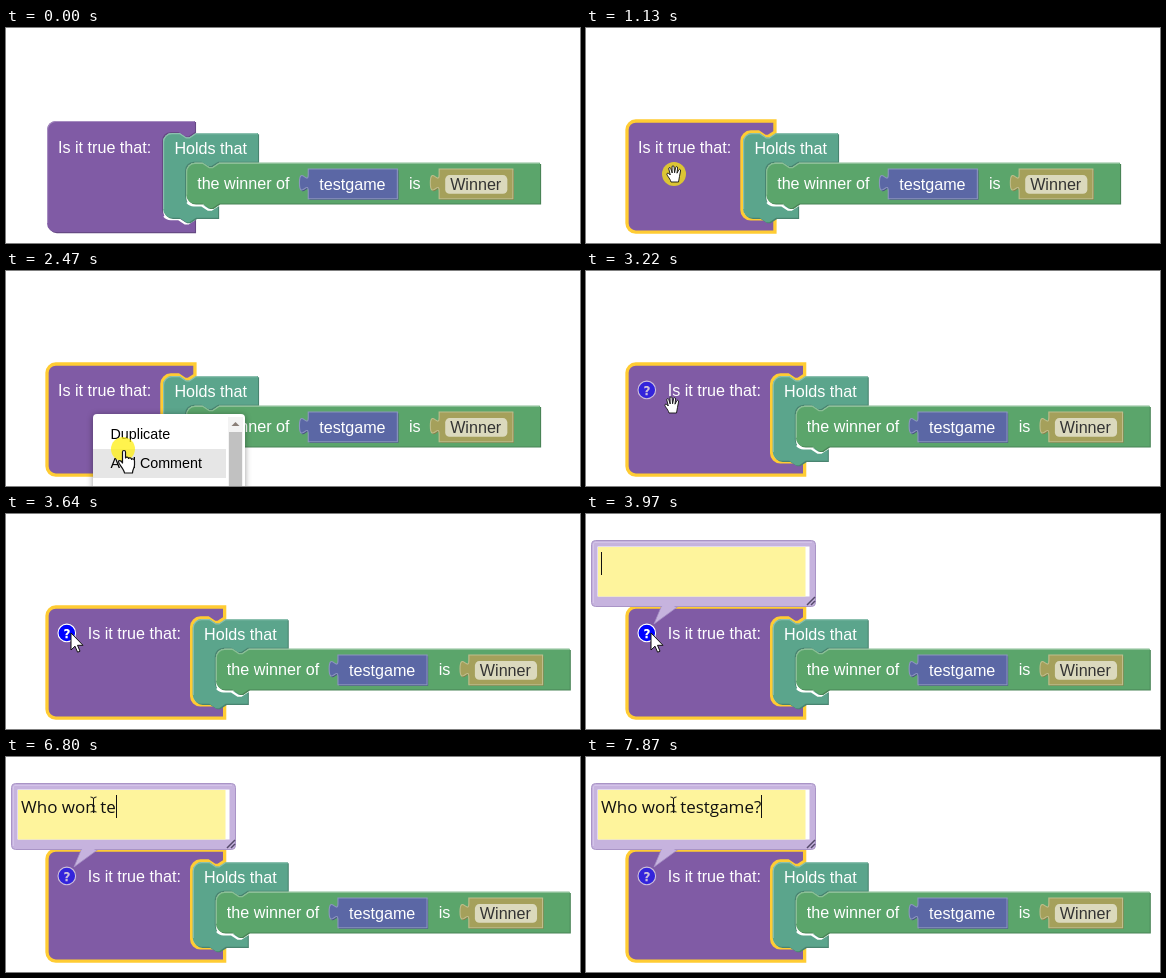
An HTML page that plays this animation: 574x215 px, repeating every 8000 ms.

```html
<!DOCTYPE html>
<html lang="en">
<head>
<meta charset="utf-8">
<title>Block comment</title>
<style>
html, body { margin: 0; width: 100%; height: 100%; overflow: hidden; background: #fff; }
svg { display: block; width: 574px; height: 215px; }
text { white-space: pre; }
.label { font: 14.667px "Liberation Sans", Arial, sans-serif; fill: #fff; }
.item { font: 14.3px "Liberation Sans", Arial, sans-serif; fill: #000; }
.note { font: 17px "Open Sans", "Noto Sans", sans-serif; fill: #111; }
.panel { filter: drop-shadow(0 1px 3px rgba(0, 0, 0, .4)); }
</style>
</head>
<body>
<svg id="stage" viewBox="0 0 574 215">
  <g id="blocks" transform="translate(41 93) scale(1.1)">
    <g id="outer"></g>
    <g id="icon" transform="translate(10 15.6)">
      <circle cx="8" cy="8" r="8" fill="#00f" stroke="#fff"/>
      <path fill="#fff" d="m6.8 10h2c.003-.617.271-.962.633-1.266 2.875-2.405.607-5.534-3.765-3.874v1.7c3.12-1.657 3.698.118 2.336 1.25-1.201.998-1.201 1.528-1.204 2.19z"/>
      <rect x="6.8" y="10.8" width="2" height="2" fill="#fff"/>
    </g>
    <text id="ask" class="label" y="29.2">Is it true that:</text>
    <g id="inner"></g>
  </g>

  <g id="bubble">
    <path d="M76 91L68 110L94 91Z" fill="#c6b3de" stroke="#a58fc4" stroke-width=".8"/>
    <rect x="5.5" y="26.5" width="224" height="66" rx="4" fill="#c6b3de" stroke="#a994c6"/>
    <path d="M7.5 89V30Q7.5 28.5 9 28.5H226" fill="none" stroke="#d3c3e8"/>
    <path d="M77 90L71 105L92 90Z" fill="#c6b3de"/>
    <rect x="11.5" y="32.5" width="212" height="50" fill="#fff"/>
    <rect x="12" y="33" width="207.5" height="49.5" fill="#fef49c"/>
    <path d="M221 91L229 83M225 91L229 87" stroke="#54486a" stroke-width="1.5"/>
    <text id="note" class="note" x="15" y="56"></text>
    <rect id="caret" y="38" width="1" height="23" fill="#111"/>
  </g>

  <g id="menu">
    <rect class="panel" x="87" y="143" width="152" height="90" rx="4" fill="#fff"/>
    <rect id="hover" x="87" width="133" height="29" fill="#e6e6e6"/>
    <text class="item" x="104.5" y="168">Duplicate</text>
    <text class="item" x="104.5" y="197">Add Comment</text>
    <rect x="222" y="146" width="15" height="69" fill="#f3f3f3"/>
    <rect x="223" y="161" width="13" height="54" fill="#c1c1c1"/>
    <path d="M225.5 155L229.5 151L233.5 155Z" fill="#8a7f78"/>
  </g>

  <circle id="click" r="12" fill="#ffee08" opacity=".72"/>
  <g id="cursor" stroke-linejoin="round"></g>
</svg>
<script>
const LOOP = 8000;
const $ = id => document.getElementById(id);
const show = (id, on) => $(id).setAttribute('display', on ? 'inline' : 'none');
const at = (x, y, body) => `<g transform="translate(${x} ${y})">${body}</g>`;
const label = (x, y, s, fill = '#fff') => `<text class="label" x="${x}" y="${y}" style="fill:${fill}">${s}</text>`;

// Mix a hex colour towards white (255) or black (0).
const mix = (hex, goal, k) => 'rgb(' + [1, 3, 5].map(i => {
  const v = parseInt(hex.slice(i, i + 2), 16);
  return Math.round(v + (goal - v) * k);
}) + ')';

const CORNER = 'M0 8A8 8 0 0 1 8 0';
const NOTCH = 'H15l6 4 3 0 6-4';
const TOOTH = 'l-6 4-3 0-6-4';
const END = 'H8a8 8 0 0 1-8-8Z';

// A statement opening; the block inside sits one unit right of and below its corner.
const mouth = (x, top, bottom) =>
  `V${top}H${x + 30}${TOOTH}H${x + 8}a8 8 0 0 0-8 8V${bottom - 8}a8 8 0 0 0 8 8H${x + 30}`;
const crevice = (x, y) =>
  `<path d="M${x + 2} ${y - 2.6}a8 8 0 0 0 6 2.8H${x + 15}l6 4 3 0 6-4" fill="none" stroke="#fff" stroke-width="2"/>`;

function block(path, color, edge) {
  return `<path d="${path}" transform="translate(1 1)" fill="${mix(color, 0, .2)}"/>` +
    `<path d="${path}" fill="${color}"/>` +
    `<path d="${edge}" fill="none" stroke="${mix(color, 255, .3)}"/>`;
}

function value(w, color, body) {
  const path = `M0 0H${w}V27H0V20c0-10-8 8-8-7.5s8 2.5 8-7.5Z`;
  return block(path, color, path) + body;
}

function outerBlock(x, selected) {
  const w = x + 30, color = '#805ba5';
  const path = CORNER + 'H' + w + mouth(x, 10, 89) + 'V101' + END;
  if (selected) return `<path d="${path}" fill="${color}" stroke="#fc3" stroke-width="3"/>`;
  return block(path, color, `M.5 93V8A7.5 7.5 0 0 1 8 .5H${w - .5}`) + crevice(x, 89);
}

function innerBlocks() {
  const teal = '#5ba58c', green = '#5ba56b', ink = '#333';
  const top = w => `V8A7.5 7.5 0 0 1 8 .5${NOTCH}H${w - .5}`;
  const holds = CORNER + NOTCH + 'H86.3' + mouth(20, 26, 65.5) + 'V77H30' + TOOTH + END;
  const fact = CORNER + NOTCH + 'H321.7V37H30' + TOOTH + END;
  const game = value(81, '#5b67a5', label(10, 19, 'testgame'));
  const winner = value(67, '#a5a05b',
    '<rect x="5.5" y="5.5" width="56.5" height="17" rx="4" fill="#fff" opacity=".6"/>' +
    label(10, 19, 'Winner', ink));
  return block(holds, teal, 'M.5 69' + top(86.3)) + label(10.3, 19.2, 'Holds that') + crevice(20, 65.5) +
    at(21, 27, block(fact, green, 'M.5 29' + top(321.7)) +
      label(10, 24, 'the winner of') + at(111, 5.7, game) +
      label(202.6, 24, 'is') + at(230, 5.7, winner));
}

const shape = (d, extra = '') => `<path d="${d}" fill="#fff" stroke="#111" ${extra}/>`;
const CURSORS = {
  none: '',
  grab: at(-8, -9, shape('M5 17C4 13 0 10 1 8.5C2 7.5 3.5 9 4.3 10L2.8 4C2.5 2.3 4.3 2 4.8 3.6L6.2 8L6 2C6 .3 8 .3 8.1 2L8.6 7.8L9.6 2.6C10 1 11.9 1.4 11.6 3L11 8.2L12.6 5C13.4 3.6 15 4.4 14.5 6C13.4 9.6 13.6 13 12.5 17Z', 'stroke-width=".9"')),
  arrow: shape('M0 0V17L4 13.2L6.6 19.2L9 18.2L6.5 12.3H12Z'),
  point: at(-5, 1, shape('M4.5 2C4.5 0 7.5 0 7.5 2V8C8 6.6 10.5 7 10.5 8.5C11 7.3 13.5 7.7 13.5 9.3C14.2 8.4 16.5 8.8 16.5 11V15C16.5 18 14.5 19 14.5 23H6.5C6 19 .5 14 .5 11.8C.5 10 3 10 4.5 13Z', 'stroke-width="1.2"')),
  beam: '<path d="M-3-7.5Q0-7.5 0-5.5Q0-7.5 3-7.5M0-5.5V5.5M-3 7.5Q0 7.5 0 5.5Q0 7.5 3 7.5M-1.5 1.5H1.5" fill="none" stroke="#111"/>'
};

// Pointer stops: time, x, y
const MOVES = [
  [590, 90, 191], [660, 88, 165], [730, 86, 143], [800, 88, 146],
  [1590, 90, 146], [1660, 93, 151], [1730, 99, 159], [1800, 107, 168], [1870, 114, 175], [1940, 117, 178],
  [3000, 114, 172], [3070, 106, 158], [3140, 95, 144], [3220, 86, 134], [3290, 81, 130],
  [3360, 77, 127], [3430, 73, 124], [3500, 70, 122], [3570, 67, 120], [3640, 65, 119],
  [4230, 67, 111], [4300, 73, 92], [4370, 79, 72], [4440, 84, 55], [4510, 87.5, 47.5]
];
const NOTE = 'Who won testgame?';
const KEYS = [5460, 5920, 6000, 6090, 6180, 6330, 6430, 6530, 6730, 6800, 6930, 7000, 7270, 7400, 7500, 7600, 7870];

const within = (t, a, b) => t >= a && t < b;

function cursorKind(t, y) {
  if (t < 590) return 'none';
  if (t < 1590) return 'grab';
  if (t < 2600) return y < 149 ? 'arrow' : 'point';
  if (t < 3500) return 'grab';
  return t < 4370 ? 'arrow' : 'beam';
}

let state = '';
function setBlocks(selected, noted) {
  const key = `${selected} ${noted}`;
  if (key === state) return;
  state = key;
  const shift = noted ? 27 : 0;
  $('outer').innerHTML = outerBlock(104.5 + shift, selected);
  $('ask').setAttribute('x', 10 + shift);
  $('inner').setAttribute('transform', `translate(${105.5 + shift} 11)`);
  show('icon', noted);
}

let kind = '';
function draw(t) {
  const [, x, y] = MOVES.filter(m => m[0] <= t).pop() || [0, 0, 0];
  setBlocks(t >= 1130, t >= 2600);
  $('icon').setAttribute('opacity', within(t, 3500, 4230) ? 1 : .6);

  show('menu', within(t, 1260, 2600));
  show('hover', t >= 1660);
  $('hover').setAttribute('y', y < 178 ? 149 : 178);

  show('bubble', t >= 3970);
  const typed = NOTE.slice(0, KEYS.filter(k => k <= t).length);
  if ($('note').textContent !== typed) $('note').textContent = typed;
  const width = typed ? $('note').getComputedTextLength() : 0;
  $('caret').setAttribute('x', Math.round(15 + width));
  show('caret', !within(t, 4510, 5060));

  show('click', within(t, 1130, 1260) || within(t, 2470, 2600) || within(t, 3840, 3970));
  $('click').setAttribute('cx', x);
  $('click').setAttribute('cy', y);
  const next = cursorKind(t, y);
  if (next !== kind) $('cursor').innerHTML = CURSORS[kind = next];
  $('cursor').setAttribute('transform', `translate(${x} ${y})`);
}

$('inner').innerHTML = innerBlocks();
const start = performance.now();
function tick() {
  draw((performance.now() - start) % LOOP);
  requestAnimationFrame(tick);
}
tick();
</script>
</body>
</html>
```
